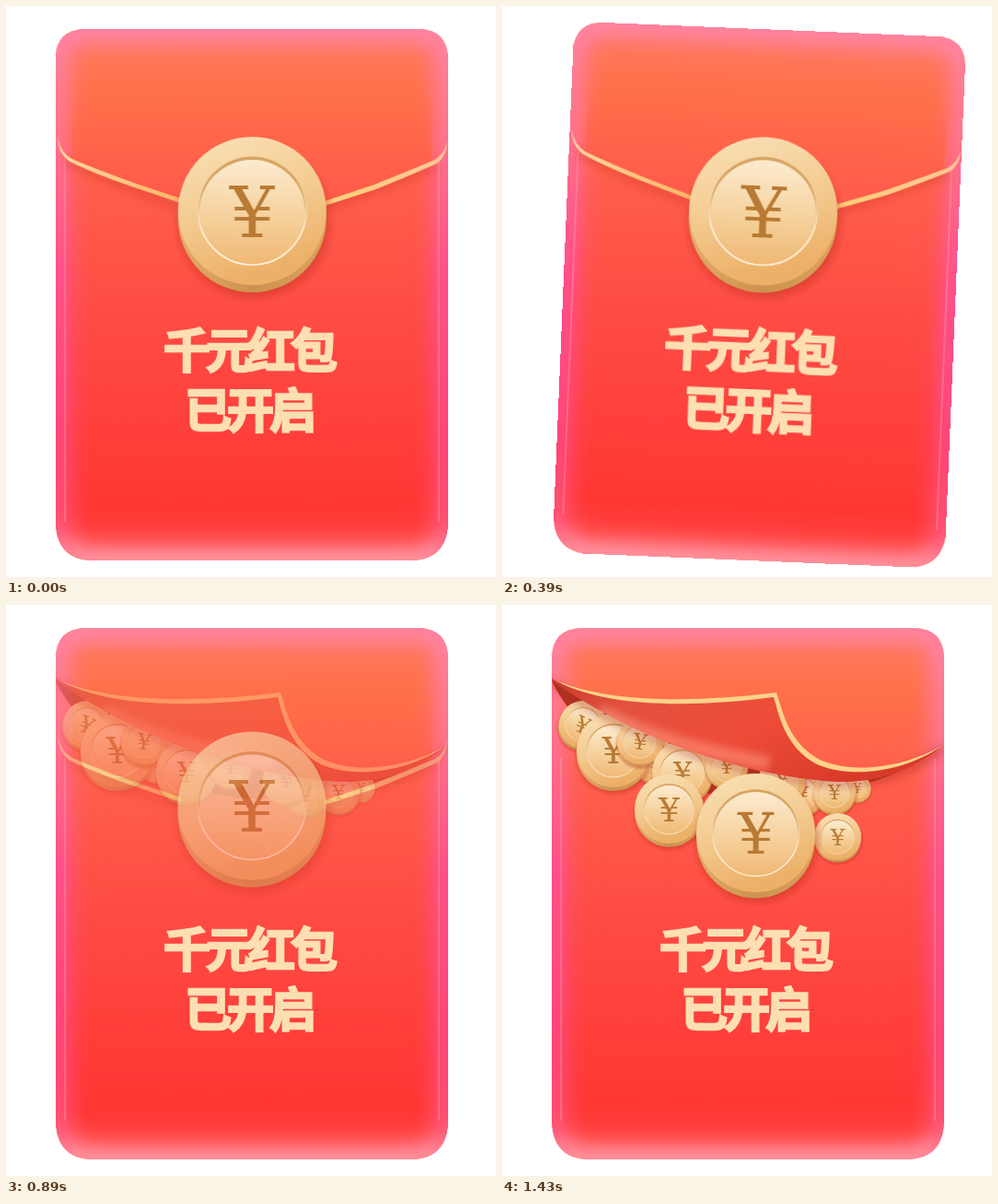
An HTML page for the animation above (1600 ms loop, 532 by 620 pixels).

```html
<!DOCTYPE html>
<html lang="zh">
<head>
<meta charset="utf-8">
<title>红包</title>
<style>
  html, body { margin: 0; width: 100%; height: 100%; overflow: hidden; background: #fff; }
  svg { display: block; width: 100%; height: 100%; }

  .swing, .cover, .seal, .slide { animation: 1600ms linear infinite; }
  .swing { animation-name: swing; }
  .envelope { transform-origin: 267px 611px; }
  .label { transform-origin: 267px 497px; }
  .cover { animation-name: cover; }
  .seal { animation-name: seal; }
  .main { animation-name: main; }
  .side { animation-name: side; }
  .left { --x: 33px; --y: -25px; }
  .right { --x: -30px; --y: -34px; }

  @keyframes swing {
    0% { transform: rotate(0deg); }
    5.625% { transform: rotate(-2.83deg); }
    24.375% { transform: rotate(2.4deg); }
    31.875%, 100% { transform: rotate(0deg); }
  }
  @keyframes cover {
    0%, 50% { opacity: 1; }
    63.125%, 100% { opacity: 0; }
  }
  @keyframes seal {
    0%, 42.5% { transform: none; }
    50% { opacity: 1; }
    65.625%, 100% { transform: translate(-1px, -8px); opacity: 0; }
  }
  @keyframes main {
    0%, 63.125% { transform: translateY(-37px); opacity: 0; }
    74.375% { opacity: 1; }
    75.625%, 100% { transform: none; opacity: 1; }
  }
  @keyframes side {
    0%, 68.75% { transform: translate(var(--x), var(--y)); opacity: 0; }
    81.875%, 100% { transform: none; opacity: 1; }
  }

  .yen { font: 77px "DejaVu Serif", serif; fill: #b87a34; text-anchor: middle; }
  .label text {
    font: 900 51px "Noto Sans CJK SC", "Noto Sans CJK", sans-serif;
    letter-spacing: -5px; text-anchor: middle;
    fill: #fddfb2; stroke: #fddfb2; stroke-width: 2.4;
  }
</style>
</head>
<body>
<svg viewBox="0 0 532 620">
  <defs>
    <linearGradient id="paper" x2="0" y2="1">
      <stop offset="0" stop-color="#ff7a60"/>
      <stop offset=".12" stop-color="#ff704a"/>
      <stop offset=".3" stop-color="#ff5d4c"/>
      <stop offset=".6" stop-color="#fe4842"/>
      <stop offset=".9" stop-color="#ff3734"/>
      <stop offset="1" stop-color="#ff4a48"/>
    </linearGradient>
    <linearGradient id="rim" x2="0" y2="1">
      <stop offset="0" stop-color="#ff86b4"/>
      <stop offset=".2" stop-color="#ff78a4"/>
      <stop offset=".45" stop-color="#ff50a8"/>
      <stop offset=".8" stop-color="#ff4a90"/>
      <stop offset=".95" stop-color="#ff5c88"/>
      <stop offset="1" stop-color="#ffb0bc"/>
    </linearGradient>
    <linearGradient id="front" x2="0" y2="1">
      <stop offset="0" stop-color="#ff7046" stop-opacity="0"/>
      <stop offset=".5" stop-color="#ff6448" stop-opacity=".7"/>
      <stop offset="1" stop-color="#ff5a4c"/>
    </linearGradient>
    <linearGradient id="lining" x2="1" y2=".5">
      <stop offset="0" stop-color="#c8382a"/>
      <stop offset=".25" stop-color="#e2513f"/>
      <stop offset=".6" stop-color="#ee4c38"/>
      <stop offset="1" stop-color="#d83a2a"/>
    </linearGradient>
    <linearGradient id="cord">
      <stop offset="0" stop-color="#ffd9a0"/>
      <stop offset=".3" stop-color="#f9b868"/>
      <stop offset=".7" stop-color="#ffd07a"/>
      <stop offset="1" stop-color="#ffc896"/>
    </linearGradient>
    <linearGradient id="face" x2=".3" y2="1">
      <stop offset="0" stop-color="#fae2b8"/>
      <stop offset=".5" stop-color="#f4cd94"/>
      <stop offset="1" stop-color="#ecb068"/>
    </linearGradient>
    <linearGradient id="edge">
      <stop offset="0" stop-color="#e2ac68"/>
      <stop offset=".5" stop-color="#cc9250"/>
      <stop offset="1" stop-color="#daa25a"/>
    </linearGradient>
    <linearGradient id="dish" x2="0" y2="1">
      <stop offset="0" stop-color="#fcebd0"/>
      <stop offset=".5" stop-color="#f6d3a0"/>
      <stop offset="1" stop-color="#efb873"/>
    </linearGradient>
    <linearGradient id="shine" x2="0" y2="1">
      <stop offset=".2" stop-color="#fff4e0" stop-opacity="0"/>
      <stop offset=".7" stop-color="#fff4e0"/>
    </linearGradient>
    <radialGradient id="shade">
      <stop offset=".8" stop-color="#b02a18" stop-opacity=".55"/>
      <stop offset="1" stop-color="#c8301c" stop-opacity="0"/>
    </radialGradient>
    <filter id="soft" x="-20%" y="-20%" width="140%" height="140%">
      <feGaussianBlur stdDeviation="12"/>
    </filter>
    <filter id="blur" x="-10%" y="-40%" width="120%" height="180%">
      <feGaussianBlur stdDeviation="4"/>
    </filter>
    <path id="outline" d="M88 25H446Q480 25 480 59V558Q480 602 438 602H96Q54 602 54 558V59Q54 25 88 25Z"/>
    <clipPath id="inside"><use href="#outline"/></clipPath>
    <path id="fold" d="M54 80C112 108 210 107 298 95C306 120 312 150 345 168C385 186 440 176 479 152C440 185 400 193 362 192C270 186 150 150 54 82Z"/>
    <clipPath id="onfold"><use href="#fold"/></clipPath>

    <g id="body">
      <use href="#outline" fill="url(#paper)"/>
      <g clip-path="url(#inside)">
        <use href="#outline" fill="none" stroke="url(#rim)" stroke-width="26" filter="url(#soft)"/>
        <path d="M64 166V560M470 166V560" stroke="#ffb0b8" stroke-opacity=".4" stroke-width="1.6"/>
      </g>
    </g>

    <!-- face radius 80.5, centred on the face -->
    <g id="coin">
      <circle cx="2" cy="12" r="90" fill="url(#shade)"/>
      <circle cy="8" r="80.5" fill="url(#edge)"/>
      <circle r="80.5" fill="url(#face)"/>
      <circle r="59" fill="#d8a563"/>
      <circle cy="2" r="57.5" fill="url(#dish)"/>
      <circle r="58.5" fill="none" stroke="url(#shine)" stroke-width="1.6"/>
      <text class="yen" y="28.5">¥</text>
    </g>
  </defs>

  <g class="swing envelope">
    <use href="#body"/>

    <g clip-path="url(#inside)">
      <path d="M54 82C80 140 170 205 262 210C350 212 430 192 478 153C440 180 400 186 362 184C270 178 150 145 54 82Z" fill="#b23322"/>
      <g id="pile"></g>
      <path d="M54 84C150 152 270 188 362 194C400 195 440 187 478 155" fill="none" stroke="#a82a1a" stroke-width="8" opacity=".45" filter="url(#blur)"/>
      <use href="#fold" fill="url(#lining)"/>
      <g clip-path="url(#onfold)">
        <path d="M105 116C165 146 215 158 290 172" fill="none" stroke="#ff9a84" stroke-width="16" opacity=".55" filter="url(#blur)"/>
      </g>
      <path d="M54 80C112 107 210 106 298 95C306 120 312 150 345 168C385 185 440 175 479 152C440 180 382 190 342 173C310 156 302 126 295 100C210 111 112 113 54 80Z" fill="#ffd288"/>
    </g>

    <g class="cover">
      <use href="#body"/>
      <g clip-path="url(#inside)">
        <path d="M64 168Q120 194 187 217M348 219Q410 196 468 174" fill="none" stroke="#c8301c" stroke-width="8" opacity=".35" filter="url(#blur)"/>
        <path d="M72 90H462V170Q420 190 348 213H187Q120 190 72 167Z" fill="url(#front)"/>
        <path d="M56 142Q59 159 72 166Q100 178 145 194L190 209V214L143 198Q98 183 70 169Q57 161 56 142Z
                 M479 147Q477 160 466 167Q440 178 400 194L346 212V217L402 199Q444 182 468 171Q479 163 479 147Z" fill="url(#cord)"/>
      </g>
    </g>

    <g class="seal"><use href="#coin" transform="translate(267.5 222.5)"/></g>
  </g>

  <g class="slide side left"><use href="#coin" transform="translate(181.5 221.5) scale(.466)"/></g>
  <g class="slide side right"><use href="#coin" transform="translate(364.5 251.5) scale(.316)"/></g>
  <g class="slide main"><use href="#coin" transform="translate(275.5 247.5) scale(.801)"/></g>

  <g class="swing label">
    <text x="263" y="392.5">千元红包</text>
    <text x="263" y="457.5">已开启</text>
  </g>
</svg>
<script>
  // x, y, radius, tilt; back to front
  const coins = [
    [88, 130, 26, 24], [165, 168, 24, 0], [121, 158, 40, 0], [150, 148, 25, 8],
    [196, 181, 33, 0], [244, 175, 23, 0], [326, 205, 23, 0], [304, 190, 25.5, 0],
    [386, 199, 14.5, 0], [361, 203, 23, 0]
  ];
  document.getElementById('pile').innerHTML = coins.map(([x, y, r, tilt]) =>
    `<use href="#coin" transform="translate(${x} ${y}) rotate(${tilt}) scale(${r / 80.5})"/>`).join('');
</script>
</body>
</html>
```
